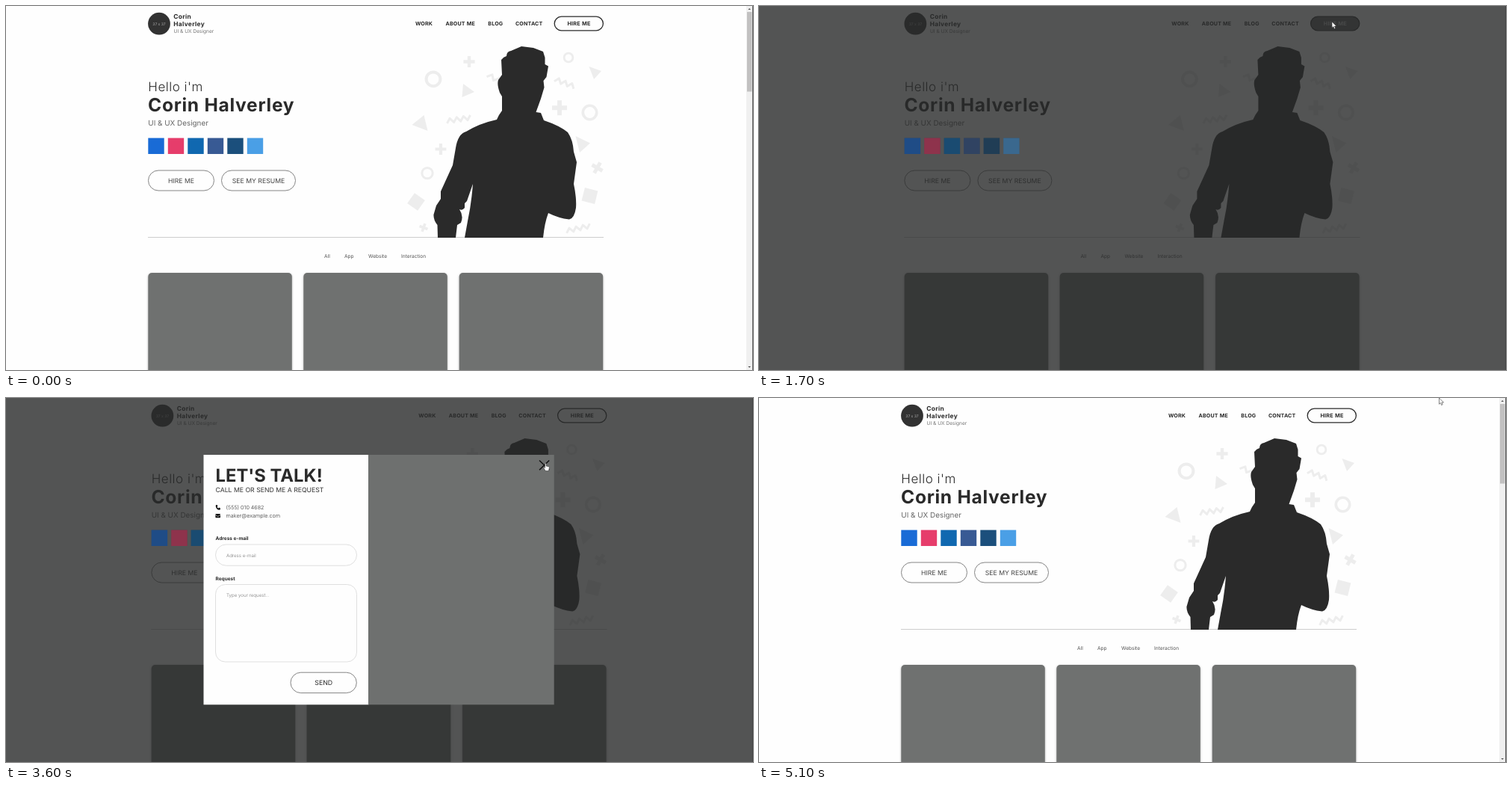
These frames come from a looping animation (1000x487 px, 5.6 s). An HTML page:

```html
<!DOCTYPE html>
<html lang="en">
<head>
<meta charset="utf-8">
<title>Portfolio with contact dialog</title>
<style>
  html, body { margin: 0; width: 100%; height: 100%; overflow: hidden; background: #fefefe; }
  svg { display: block; width: 100%; height: 100%; }
  text { font-family: Inter, "Open Sans", sans-serif; fill: #2a2a2a; text-rendering: geometricPrecision; white-space: pre; }
  .bold { font-weight: 700; }
  .light { font-weight: 300; }
  .mid { text-anchor: middle; }
  .deco { fill: #ededed; }
  .line { fill: none; stroke: #ededed; }
  .pill { fill: none; stroke: #777; stroke-width: .9; }
  .field { fill: none; stroke: #dcdcdc; stroke-width: .9; }
  .card { fill: #6f7170; filter: drop-shadow(0 1px 1.5px rgba(0, 0, 0, .3)); }
</style>
</head>
<body>
<svg id="stage" viewBox="0 0 1000 487" preserveAspectRatio="none">
  <rect width="1000" height="487" fill="#fefefe"/>
  <g id="page">
    <circle cx="205" cy="23.7" r="14.9" fill="#323232"/>
    <g id="deco"></g>
    <path d="M190 309.5H800" stroke="#cdcdcd"/>
    <path id="person" fill="#2a2a2a" d="M664 92 L663 72 Q666 68 670 67 Q670 61 676 60 L690 54 L706 56 L719 61
      L721.5 69 L721.5 78 L726 80.5 L723.5 95 L719.5 100 L720.5 109 L716 124 L709.5 142 L716 143
      L720 153 Q741 160 752 169 Q759 179 760 195 L764 209 L760 238 Q764 257 763 270
      Q761 284 754 285.5 Q740 284 726 277 Q721 290 719 310 L614 310 L618 288 Q623 265 625 238 L617 261 L614 264
      L614 270 Q611 274 607 272 Q613 281 609 290 L604 293 L602 310 L578 310 L577.5 293 Q572 286 572.5 279
      L576 267 L582 258 L582 248 L598 213 L602 190 Q605 171 616 168 Q634 157 657 152 Q660 145 664 140
      L664 121 L661 116 Q657 105 659 99 Z"/>
    <g id="cards"></g>
    <rect class="pill" x="190.5" y="220" width="88" height="27" rx="13.5"/>
    <rect class="pill" x="288.5" y="220" width="99" height="27" rx="13.5"/>
    <g id="icons"></g>
    <g id="words"></g>
    <rect id="cta" x="734.2" y="14.2" width="65.2" height="18.6" rx="9.3" fill="#2a2a2a" stroke="#2a2a2a" stroke-width="1.3"/>
    <text id="ctaText" class="bold mid" x="767" y="26.2" font-size="7.3" letter-spacing=".2">HIRE ME</text>
  </g>
  <g id="bar">
    <rect x="991" width="9" height="487" fill="#f0f0f0"/>
    <rect x="992" y="8" width="6.5" height="106.5" fill="#c2c1c1"/>
    <path d="M993.4 5L995.2 3L997 5ZM993.4 482L995.2 484L997 482Z" fill="#555"/>
  </g>
  <rect id="shade" width="1000" height="487" fill="#292a2a"/>
  <g id="glow"></g>
  <rect x="999.2" width=".8" height="487" fill="#3c3c3c"/>
  <g id="dialog">
    <rect x="264.5" y="76" width="221" height="334.3" fill="#fefefe"/>
    <rect x="485" y="76" width="248.7" height="334.3" fill="#6e706f"/>
    <path d="M714 83.5L727.2 96.2M727.2 83.5L714 96.2" stroke="#111" stroke-width="1.5"/>
    <path d="M281.4 143.6Q281.6 148.8 286.3 149" fill="none" stroke="#111" stroke-width="1.5"/>
    <path d="M281 143.3L282.7 143L283.4 145L281.6 146ZM284.2 147.6L285 146.6L287 147.4L286.6 149.4Z" fill="#111"/>
    <rect x="280.4" y="155" width="6.6" height="5.2" rx=".8" fill="#111"/>
    <path d="M280.4 156.4L283.7 158.5L287 156.4" fill="none" stroke="#fefefe" stroke-width=".6"/>
    <rect class="field" x="280.5" y="196" width="189" height="28.2" rx="14.1"/>
    <rect class="field" x="280.5" y="249.5" width="189" height="103.5" rx="13"/>
    <rect class="pill" x="381" y="367.2" width="88.3" height="27.4" rx="13.7"/>
    <g id="dialogWords"></g>
  </g>
  <g id="cursor" stroke="#333" stroke-width=".6" stroke-linejoin="round">
    <path id="arrow" fill="#fff" d="M0 0V8.2L1.9 6.5L3.1 9.5L4.6 8.8L3.4 6H6Z"/>
    <path id="hand" fill="#fff" d="M0 .8Q.8 -.4 1.6 .8V4L5 4.8Q6 5.2 5.8 6.4L5 10.6H.8L-1.8 6.6Q-1.8 5.4 -.8 5.8L0 6.4Z"/>
  </g>
</svg>
<script>
const LOOP = 5600;
const $ = id => document.getElementById(id);

function add(parent, tag, attrs, content) {
  const el = document.createElementNS("http://www.w3.org/2000/svg", tag);
  for (const key in attrs) el.setAttribute(key, attrs[key]);
  if (content) el.textContent = content;
  return $(parent).appendChild(el);
}

function write(parent, content, x, y, size, cls = "", fill = "#2a2a2a", spacing = 0) {
  add(parent, "text", { x, y, class: cls, "font-size": size, "letter-spacing": spacing, style: `fill:${fill}` }, content);
}

// Header, intro and filter text
write("words", "37 x 37", 205, 25.6, 5, "mid", "#aaa");
write("words", "Corin", 224.3, 17, 8.4, "bold", "#2a2a2a", .3);
write("words", "Halverley", 224.3, 26.5, 8.4, "bold", "#2a2a2a", .3);
write("words", "UI & UX Designer", 224.5, 36.2, 6.6, "", "#777");
[["WORK", 559.5], ["ABOUT ME", 608.2], ["BLOG", 655.3], ["CONTACT", 700.2]]
  .forEach(([label, x]) => write("words", label, x, 26.2, 7.1, "bold mid", "#2a2a2a", .2));
write("words", "Hello i'm", 190.3, 113.8, 17, "light", "#2a2a2a", .5);
write("words", "Corin Halverley", 190, 140.6, 24.6, "bold", "#2a2a2a", .7);
write("words", "UI & UX Designer", 190.3, 159.5, 9.9, "", "#666");
write("words", "HIRE ME", 234.5, 236.6, 8.7, "mid", "#444");
write("words", "SEE MY RESUME", 338, 236.6, 8.7, "mid", "#444");
[["All", 426], ["App", 453], ["Website", 485], ["Interaction", 529]]
  .forEach(([label, x]) => write("words", label, x, 337.2, 6.6, "", "#555"));

// Dialog text
write("dialogWords", "LET'S TALK!", 280.5, 112, 23.8, "bold");
write("dialogWords", "CALL ME OR SEND ME A REQUEST", 280.5, 126.2, 8.7, "", "#333");
write("dialogWords", "(555) 010 4682", 294.6, 149, 7.2, "light", "#333");
write("dialogWords", "maker@example.com", 294.6, 160.3, 7.2, "light", "#333");
write("dialogWords", "Adress e-mail", 280.5, 190, 6.5, "bold");
write("dialogWords", "Adress e-mail", 295, 212.5, 6.2, "light", "#777");
write("dialogWords", "Request", 280.5, 243.6, 6.5, "bold");
write("dialogWords", "Type your request...", 295, 266.2, 6.2, "light", "#777");
write("dialogWords", "SEND", 425.2, 384, 8.8, "mid");

// Social squares; a faint copy shines through the shade
["#196bd6", "#e63d6b", "#1068b0", "#385a94", "#1b4f7c", "#4a9fe6"].forEach((fill, i) => {
  const square = { x: 190.3 + 26.5 * i, y: 176.6, width: 21.4, height: 21.4, fill };
  add("icons", "rect", square);
  add("glow", "rect", square);
});

[190.3, 398.3, 606.7].forEach(x =>
  add("cards", "rect", { class: "card", x, y: 357, width: 192.5, height: 150, rx: 5 }));

// Confetti behind the figure
[[572, 97.8, 9.4, 4], [753, 69, 5.9, 2.8], [781.5, 142.5, 9.2, 3.6], [564, 223.6, 7.2, 3]]
  .forEach(([cx, cy, r, w]) => add("deco", "circle", { class: "line", cx, cy, r, "stroke-width": w }));
[[620, 74.5, 7.6, 4.4, 0], [741, 136.2, 10, 6, 0], [582, 191.5, 7.4, 4.2, 0],
 [791.5, 216.5, 8, 5, 30], [559, 296.5, 5.8, 3.6, 20]].forEach(([x, y, r, w, turn]) =>
  add("deco", "path", { class: "line", d: `M${-r} 0H${r}M0 ${-r}V${r}`, "stroke-width": w,
    transform: `translate(${x} ${y}) rotate(${turn})` }));
["612,104 627,115 610.5,122", "780.5,81 797,87 787,98", "543.5,159 559.5,146 564.5,167", "762.5,174 782,183.5 768,196"]
  .forEach(points => add("deco", "polygon", { class: "deco", points }));
[[549, 262, 17, 35], [781.5, 254, 18, 14]].forEach(([x, y, s, turn]) =>
  add("deco", "rect", { class: "deco", x: -s / 2, y: -s / 2, width: s, height: s,
    transform: `translate(${x} ${y}) rotate(${turn})` }));

function zigzag(x1, y1, x2, y2, n) {
  const len = Math.hypot(x2 - x1, y2 - y1), nx = -(y2 - y1) / len, ny = (x2 - x1) / len;
  let d = "";
  for (let i = 0; i <= n; i++) {
    const k = i / n, side = i % 2 ? -3 : 3;
    d += `${i ? "L" : "M"}${x1 + (x2 - x1) * k + nx * side} ${y1 + (y2 - y1) * k + ny * side}`;
  }
  add("deco", "path", { class: "line", d, "stroke-width": 3, "stroke-linejoin": "round" });
}
zigzag(590, 154, 622, 149, 7);
zigzag(645, 92, 663, 102, 4);
zigzag(735, 98, 761, 108, 6);
zigzag(750, 301, 782, 294, 7);

// Cursor path: time, x, y
const path = [[200, 1003, 5], [700, 768, 21], [1700, 767, 21], [2870, 767, 21], [2900, 764, 23],
  [3400, 724, 82], [3480, 724, 82], [3600, 721.5, 87], [4640, 721.5, 87], [5100, 910.5, 0], [LOOP, 910.5, 0]];

const ramp = (t, from, to) => Math.min(1, Math.max(0, (t - from) / (to - from)));
const ease = k => k * k * (3 - 2 * k);
const show = (id, on) => $(id).setAttribute("visibility", on ? "visible" : "hidden");
const fade = (id, k) => $(id).setAttribute("opacity", k);

function cursorAt(t) {
  const i = Math.max(1, path.findIndex(p => p[0] >= t));
  const [t0, x0, y0] = path[i - 1], [t1, x1, y1] = path[i];
  const k = ease(ramp(t, t0, t1));
  return [x0 + (x1 - x0) * k, y0 + (y1 - y0) * k];
}

function draw(t) {
  const locked = t >= 1700 && t < 4500;
  const shift = locked ? 4.4 : 0;
  const shade = locked ? 1 - ramp(t, 4310, 4500) : 0;
  for (const id of ["page", "glow"]) $(id).setAttribute("transform", `translate(${shift} 0)`);
  show("bar", !locked);
  fade("shade", .8 * shade);
  fade("glow", .42 * shade);
  fade("dialog", ease(ramp(t, 1800, 2200)) * (1 - ease(ramp(t, 4050, 4280))));

  const hover = ramp(t, 790, 1050) * (1 - ramp(t, 1650, 1840));
  const ink = Math.round(42 + 212 * hover);
  $("cta").setAttribute("fill-opacity", hover);
  $("ctaText").style.fill = `rgb(${ink},${ink},${ink})`;

  const [x, y] = cursorAt(t);
  const hand = t >= 3450 && t < 4600;
  $("cursor").setAttribute("transform", `translate(${x} ${y})`);
  const seen = t >= 200 && (t < 1000 || t >= 1700);
  show("arrow", seen && !hand);
  show("hand", seen && hand);
}

const start = performance.now();
function tick() {
  draw((performance.now() - start) % LOOP);
  requestAnimationFrame(tick);
}
draw(0);
requestAnimationFrame(tick);
</script>
</body>
</html>
```
